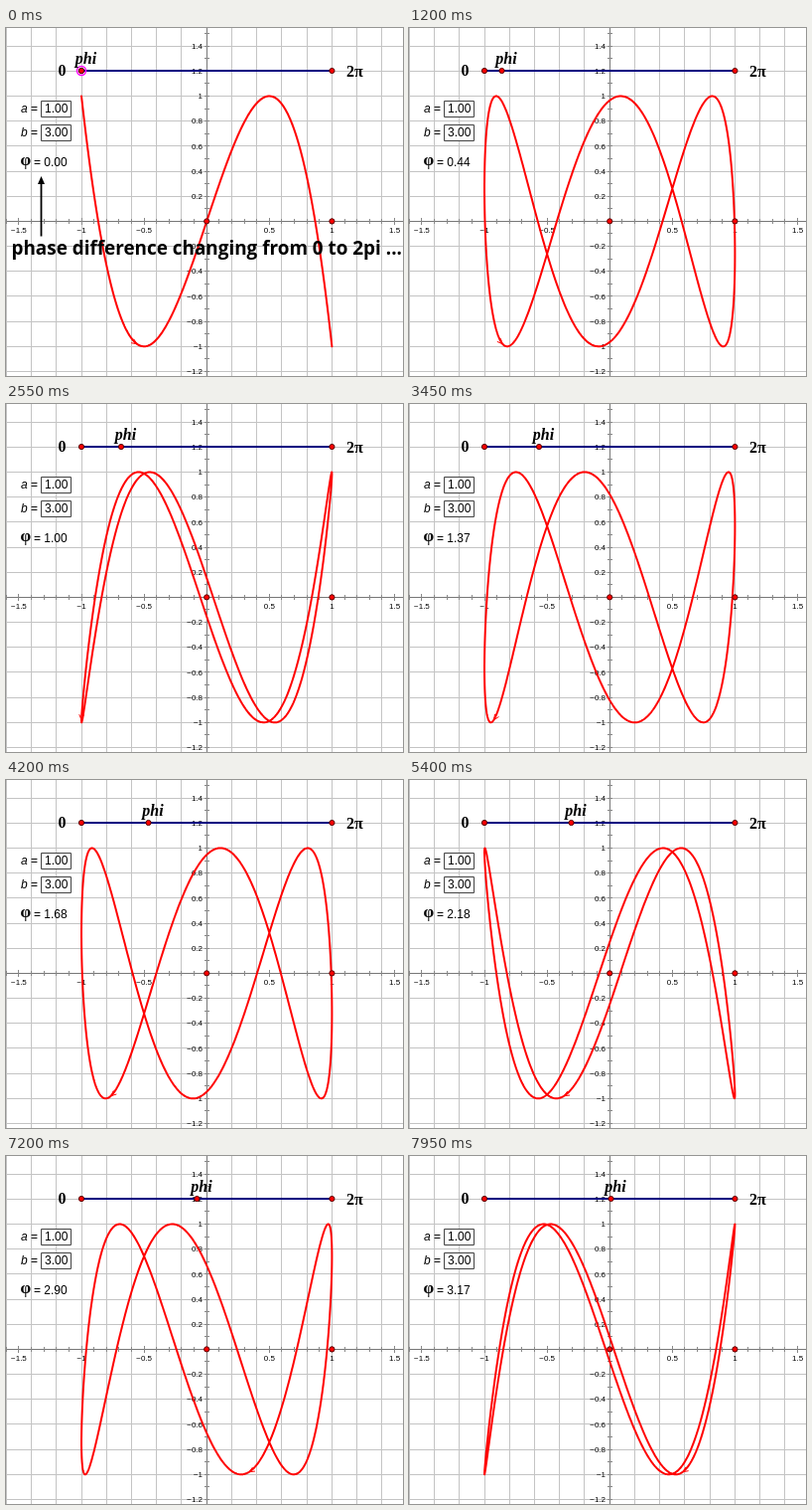
Write an HTML page with a canvas that moves like this. It is 400 px wide and 350 px high and loops after 8 s.

```html
<!DOCTYPE html>
<html lang="en">
<head>
<meta charset="utf-8">
<title>Phase difference</title>
<style>
html, body { margin: 0; width: 100%; height: 100%; overflow: hidden; background: #fff; }
canvas { display: block; width: 400px; height: 350px; }
</style>
</head>
<body>
<canvas id="stage" width="400" height="350"></canvas>
<script>
const ctx = document.getElementById('stage').getContext('2d');
const LOOP = 8000, STEP = 150, DPHI = 0.06223;
const OX = 202.22, OY = 194.38, UX = 126.2, UY = 125.9;
const SANS = '"Liberation Sans", Arial, sans-serif';
const SERIF = '"Liberation Serif", "Times New Roman", serif';
const START = -0.59; // parameter where the curve's arrowhead sits

const px = x => OX + x * UX;
const py = y => OY - y * UY;
const crisp = v => Math.floor(v) + 0.5;

function line(x1, y1, x2, y2, color, width = 1) {
  ctx.strokeStyle = color;
  ctx.lineWidth = width;
  ctx.beginPath();
  ctx.moveTo(x1, y1);
  ctx.lineTo(x2, y2);
  ctx.stroke();
}

function text(str, x, y, font, align = 'left') {
  ctx.font = font;
  ctx.textAlign = align;
  ctx.fillStyle = '#000';
  ctx.fillText(str, x, y);
}

function dot(x, y) {
  ctx.beginPath();
  ctx.arc(x, y, 2.6, 0, Math.PI * 2);
  ctx.fillStyle = '#f00';
  ctx.fill();
  ctx.strokeStyle = '#500';
  ctx.lineWidth = 1;
  ctx.stroke();
}

function drawGrid() {
  const cx = crisp(OX), cy = crisp(OY);
  for (let k = -8; k <= 8; k++) {
    const x = crisp(px(k / 5)), y = crisp(py(k / 5));
    line(x, 0, x, 350, '#c4c4c4');
    line(0, y, 400, y, '#c4c4c4');
  }
  line(0, cy, 400, cy, '#777');
  line(cx, 0, cx, 350, '#777');
  for (let k = -16; k <= 16; k++) {
    const x = crisp(px(k / 10)), y = crisp(py(k / 10));
    const r = k % 5 ? 2.5 : 3.5;
    line(x, cy - r, x, cy + r, '#888');
    line(cx - 2.5, y, cx + 2.5, y, '#888');
  }
  const font = '8px ' + SANS;
  const label = v => String(v).replace('-', '\u2212');
  for (let k = -3; k <= 3; k++) {
    if (k) text(label(k / 2), px(k / 2), 206, font, 'center');
  }
  for (let k = -6; k <= 7; k++) {
    if (k) text(label(k / 5), 198, py(k / 5) + 2.7, font, 'right');
  }
}

function drawCurve(phi) {
  const at = t => [px(Math.sin(t - phi)), py(Math.sin(3 * t))];
  ctx.strokeStyle = '#f00';
  ctx.lineWidth = 2;
  ctx.lineJoin = 'round';
  ctx.beginPath();
  for (let i = 0; i <= 500; i++) ctx.lineTo(...at(START + i * Math.PI / 250));
  ctx.stroke();

  const [x, y] = at(START), [x2, y2] = at(START + 0.01);
  const dir = Math.atan2(y2 - y, x2 - x);
  ctx.lineWidth = 1;
  ctx.beginPath();
  for (const turn of [-0.4, 0.4]) {
    ctx.moveTo(x, y);
    ctx.lineTo(x - 6 * Math.cos(dir + turn), y - 6 * Math.sin(dir + turn));
  }
  ctx.stroke();
}

function drawSlider(phi, selected) {
  const y = 43, x = px(phi / Math.PI - 1);
  line(px(-1), y, px(1), y, '#000080', 2);
  dot(px(-1), y);
  dot(px(1), y);
  dot(x, y);
  if (selected) {
    ctx.beginPath();
    ctx.arc(x, y, 4.5, 0, Math.PI * 2);
    ctx.strokeStyle = '#f0f';
    ctx.lineWidth = 1.5;
    ctx.stroke();
  }
  text('0', 52.5, 48, 'bold 16px ' + SERIF);
  text('2π', 343, 48.5, 'bold 16px ' + SERIF);
  text('phi', x + 4.5, 36, 'italic bold 16px ' + SERIF, 'center');
}

function drawField(name, value, y) {
  text(name, 15, y, 'italic 12px ' + SANS);
  text('=', 25, y, '12px ' + SANS);
  ctx.fillStyle = '#fff';
  ctx.fillRect(35, y - 12, 31, 17);
  ctx.strokeStyle = '#444';
  ctx.lineWidth = 1;
  ctx.strokeRect(35.5, y - 11.5, 30, 16);
  text(value, 39, y, '12px ' + SANS);
}

function drawCaption() {
  line(35.5, 209.5, 35.5, 154, '#000', 1.8);
  ctx.fillStyle = '#000';
  ctx.beginPath();
  ctx.moveTo(35.5, 149);
  ctx.lineTo(39, 157);
  ctx.lineTo(32, 157);
  ctx.fill();
  text('phase difference changing from 0 to 2pi ...', 5.5, 227.5,
    'bold 18.9px "Open Sans", "Noto Sans", sans-serif');
}

// Steady steps after a first hold; the pace eases slightly near pi.
function phase(n) {
  const k = n <= 44 ? Math.max(0, n - 1) : 43 + (n - 44) * 8 / 9;
  return k * DPHI;
}

function draw(ms) {
  const n = Math.floor(ms / STEP), phi = phase(n);
  ctx.fillStyle = '#fff';
  ctx.fillRect(0, 0, 400, 350);
  drawGrid();
  drawCurve(phi);
  dot(OX, OY);
  dot(px(1), OY);
  drawSlider(phi, n === 0);
  drawField('a', '1.00', 85);
  drawField('b', '3.00', 109);
  text('φ', 14.5, 138, 'bold 17px ' + SERIF);
  text('= ' + phi.toFixed(2), 28, 139, '12px ' + SANS);
  if (n === 0) drawCaption();
}

const begin = performance.now();
function tick() {
  draw((performance.now() - begin) % LOOP);
  requestAnimationFrame(tick);
}
tick();
</script>
</body>
</html>
```
